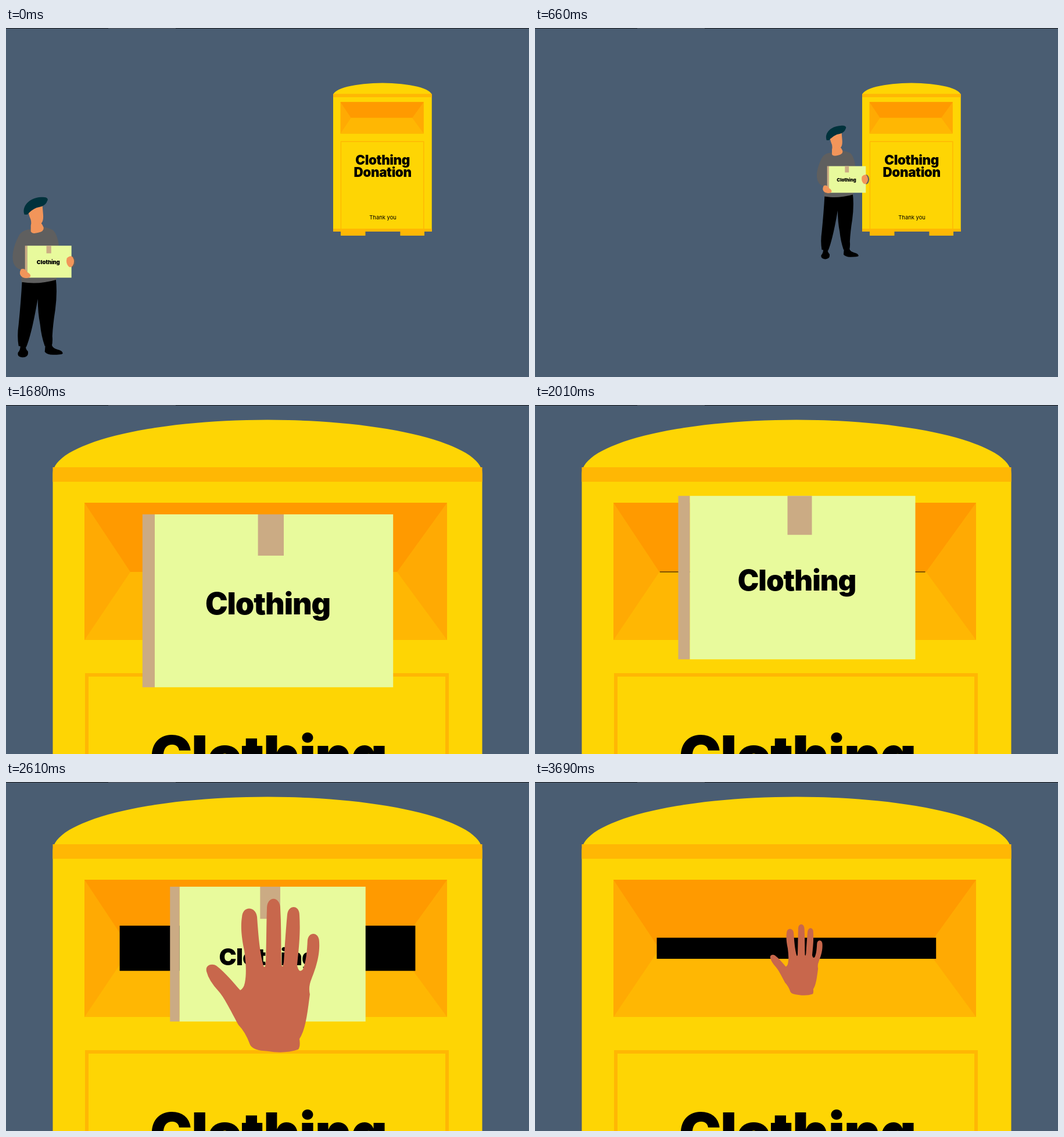
Recreate the animation shown at these times as an HTML page. Size 900x600 px, loop 3720 ms.

```html
<!DOCTYPE html>
<html lang="en">
<head>
<meta charset="utf-8">
<title>Clothing donation</title>
<style>
  html, body { margin: 0; width: 100%; height: 100%; overflow: hidden; background: #4a5d72; }
  svg { display: block; width: 900px; height: 600px; }
  text { font-family: Inter, sans-serif; font-weight: 900; letter-spacing: -.02em; text-anchor: middle; }
  .small { font-weight: 400; letter-spacing: 0; }
</style>
</head>
<body>
<svg viewBox="0 0 900 600">
  <defs>
    <g id="box">
      <path fill="#cbab84" d="M-204-140.500h20v281h-20z"/>
      <path fill="#e8fa9c" d="M-184-140.500h388v281h-388z"/>
      <path fill="#cbab84" d="M-16-140.500h42v67h-42z"/>
      <text y="22.500" font-size="49">Clothing</text>
    </g>
  </defs>

  <g id="bin">
    <path fill="#ffb704" d="M137 1130h185v38h-185zM583 1130h181v38h-181z"/>
    <path fill="#fed504" d="M80.500 1138V118A369.500 92.500 0 0 1 819.500 118V1138z"/>
    <path fill="#ffb704" d="M80.500 107H819.500v25H80.500zM80.500 1116H819.500v22H80.500z"/>
    <path fill="#ffaa03" d="M135 168H759V404H135z"/>
    <path fill="#ff9a00" d="M135 168H759L673 287H214z"/>
    <path fill="#ffb703" d="M135 404H759L673 287H214z"/>
    <path fill="none" stroke="#ffb704" stroke-width="6" d="M139 464H759V1119H139z"/>
    <text x="451" y="639" font-size="98">Clothing</text>
    <text x="451" y="727" font-size="98">Donation</text>
    <text class="small" x="453" y="1046" font-size="41">Thank you</text>
  </g>

  <g id="man">
    <path d="M24 547L33 546Q33 553 37 556Q39 566 28 566.500Q18 566 20 558Q24 554 24 547zM67 545H78Q80 551 88 553Q97 555 97 560Q95 562 80 562Q70 562 66 557z"/>
    <path d="M27 434Q55 443 85 431Q88 455 84 485Q80 510 79 530Q80 540 78 547H66Q60 530 58 510Q54 490 54 466Q48 500 43 520Q38 540 34 549L21 547Q18 530 21 510Q25 470 27 434z"/>
    <path fill="#5f5f5f" d="M42 346C30 348 25 350 20 360C12 376 10 390 11 398Q12 412 25 416L26 437Q55 442 86 433L88 420 90 372Q86 348 76 346Q66 342 63 343Z"/>
    <path fill="#f2955a" d="M38 318Q46 310 62 306L63 318C64 328 63 333 60 336Q62 338 64 343Q65 350 55 352Q44 355 42 350V340Q44 333 40 325z"/>
    <path fill="#00323c" d="M31 321C26 308 38 292 60 291C70 290 73 294 70 298C68 305 60 308 52 309Q43 313 36 321z"/>
    <ellipse cx="112" cy="402" rx="7" ry="10" fill="#5f5f5f"/>
    <use href="#box" transform="translate(72 402) scale(.196)"/>
    <path fill="#f2955a" d="M25 415Q31 412 36 420Q43 424 41 428Q36 432 28 429Q20 424 25 415zM104 396Q110 390 114 394Q119 402 114 409Q110 414 106 409Q102 404 104 396z"/>
  </g>

  <rect id="slot"/>
  <use id="parcel" href="#box"/>
  <path id="hand" fill="#c8674c" d="M345 326C342 315 354 311 362 316C378 328 392 346 403 358Q409 355 411 345Q415 325 410 290C404 262 404 245 406 232C407 212 430 213 432 232C434 260 436 290 443 316Q446 322 447 310C448 280 448 250 449 216C450 195 471 196 472 216C474 250 473 285 474 314Q476 322 478 310Q481 260 484 228C486 210 505 211 505 228C507 260 504 285 501 315Q504 330 511 322C517 308 518 290 519 272C521 256 539 258 539 274C541 300 531 325 526 338Q520 352 523 365C519 395 516 425 505 442Q507 455 503 460Q480 468 450 463Q425 462 420 452Q412 430 400 418C385 390 375 370 366 360Q349 342 345 326z"/>

  <path fill="#17181c" d="M0 0H900V1H0z"/>
  <path fill="#484a50" d="M176 0H292V1H176z"/>
</svg>
<script>
const LOOP = 3720;
const [bin, man, slot, parcel, hand] =
  ['bin', 'man', 'slot', 'parcel', 'hand'].map(id => document.getElementById(id));

const progress = (t, from, to) => Math.min(1, Math.max(0, (t - from) / (to - from)));
const smooth = p => p * p * (3 - 2 * p);
const mix = (a, b, p) => a + (b - a) * p;
const show = (el, visible) => el.setAttribute('visibility', visible ? 'visible' : 'hidden');
const place = (el, x, y, scale) =>
  el.setAttribute('transform', `translate(${x} ${y}) scale(${scale})`);

// time, x, y, scale
const handKeys = [
  [2160, -200, 320, 1.45],
  [2610, 0, 0, 1],
  [3060, 243, 149, .47],
  [3120, 245.500, 152, .462],
];

function drawScene(t) {
  const walk = progress(t, 0, 660);
  place(man, 476 * walk, -74.500 * walk, 1 - .167 * walk);
  man.setAttribute('opacity', 1 - progress(t, 690, 810));

  const zoom = smooth(progress(t, 720, 1140));
  place(bin, mix(544.500, 0, zoom), mix(88.700, 0, zoom), mix(.2297, 1, zoom));
}

function drawSlot(t) {
  const open = smooth(progress(t, 2000, 2960)) - smooth(progress(t, 3240, 3970));
  const height = Math.max(1, 111 * open);
  const width = 456 + .68 * height;
  const narrow = Math.max(0, 1 - height / 37);
  slot.setAttribute('x', 450 - 7 * narrow - width / 2);
  slot.setAttribute('y', 285.800 + 1.2 * narrow - height / 2);
  slot.setAttribute('width', width);
  slot.setAttribute('height', height);
  show(slot, t >= 1980);
}

function drawParcel(t) {
  const rise = (1 - progress(t, 1260, 1980)) ** 3;
  const push = Math.max(0, (t - 2010) / 1050);
  const scale = 1 + .8 * rise - .46 * push ** 1.73;
  place(parcel, 450.500, 296.800 + 556 * rise - 1.5 * Math.min(1, push), Math.max(0, scale));
  show(parcel, t >= 1260 && scale > 0);
}

function drawHand(t) {
  const found = handKeys.findIndex(key => key[0] > t);
  const i = found < 0 ? handKeys.length - 1 : Math.max(1, found);
  const [a, b] = [handKeys[i - 1], handKeys[i]];
  const p = progress(t, a[0], b[0]);
  place(hand, ...[1, 2, 3].map(k => mix(a[k], b[k], p)));
  show(hand, t >= 2160);
}

function frame() {
  const t = performance.now() % LOOP;
  drawScene(t);
  drawSlot(t);
  drawParcel(t);
  drawHand(t);
  requestAnimationFrame(frame);
}
frame();
</script>
</body>
</html>
```
